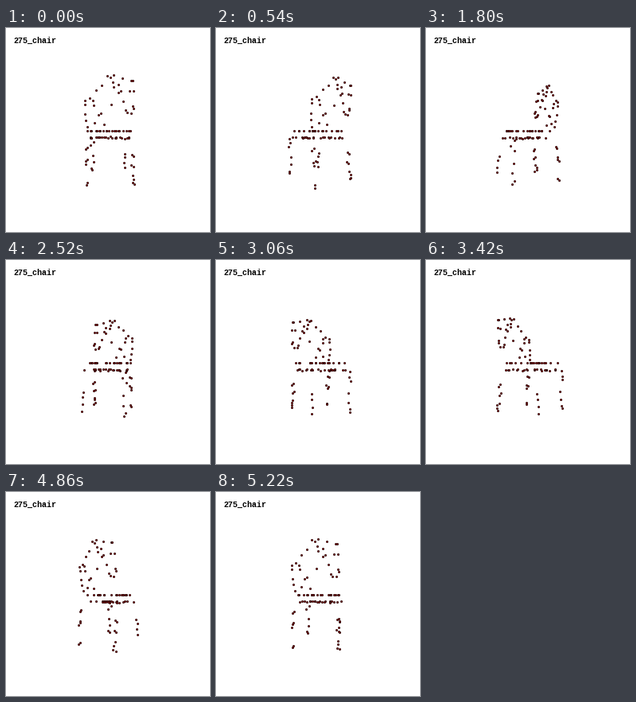
Write a matplotlib script that moves like this. It is 256 px wide and 256 px high and loops after 5400 ms.

```python
import numpy as np
import matplotlib.pyplot as plt
from matplotlib.animation import FuncAnimation

SIZE, DPI = 256, 100
FRAMES, STEP_MS = 30, 180
CENTER, CAMERA = 128, 230
rng = np.random.default_rng(7)

# Backrest: x (right) and y (up); depth follows from the lean of the back.
BACK = np.array([
    (-1.7, 60), (1.7, 58), (5.2, 60.5), (14.8, 57.2), (24.3, 54.8), (26, 54.6),
    (-7.8, 50.4), (-14, 45), (4.4, 53), (5.2, 48), (10.4, 50.4), (10.5, 42),
    (13, 43.7), (23, 43.7), (27.2, 43.5), (-27, 34), (-21.5, 36.7), (-18, 34),
    (-17, 28.7), (-27, 29.6), (2.7, 29.5), (16, 33), (27, 27.6), (27.6, 25),
    (18.7, 23), (20.5, 20.5), (25, 19.6), (-11.6, 18), (-9, 19.7), (-27, 18.9),
    (-26, 11.7), (-24.5, 4.5), (-16.3, 9), (-5.4, 7.2),
])

# Legs: foot position (x, z), splay per unit of drop, and drops below the seat.
LEGS = [
    (-23.5, -33, 0, [10, 16, 21, 35, 45, 53, 56]),
    (23.5, -33, 0, [33, 38, 46, 53]),
    (-26, 22, 0.1, [19, 21, 32, 34, 37, 58, 60]),
    (26, 22, 0.1, [27, 29, 38, 40, 50, 53, 57, 59]),
]


def backrest():
    x, y = BACK.T
    z = 22.5 + 0.13 * y + 0.09 * np.minimum(x, 0)
    return np.column_stack([x, y, z])


def seat(n, y):
    x = rng.permutation(np.linspace(-26, 26, n)) + rng.uniform(-1.5, 1.5, n)
    z = np.linspace(-32, 22, n) + rng.uniform(-2, 2, n)
    return np.column_stack([x, np.full(n, y), z])


def leg(x, z, splay, drops):
    drops = np.array(drops)
    jx, jz = rng.uniform(-2.2, 2.2, (2, len(drops)))
    return np.column_stack([x + jx, -drops, z + splay * drops + jz])


def project(points, angle):
    x, y, z = points.T
    c, s = np.cos(angle), np.sin(angle)
    scale = CAMERA / (CAMERA - (z * c - x * s))
    return np.column_stack([CENTER + (x * c + z * s) * scale, CENTER - y * scale])


chair = np.vstack([backrest(), seat(20, -0.3), seat(22, -8.6)] + [leg(*l) for l in LEGS])

fig = plt.figure(figsize=(SIZE / DPI, SIZE / DPI), dpi=DPI, facecolor="white")
ax = fig.add_axes([0, 0, 1, 1])
ax.set(xlim=(0, SIZE), ylim=(SIZE, 0))
ax.axis("off")

px = 72 / DPI
ax.text(9.2, 19, "275_chair", family="Liberation Mono", weight="bold",
        size=10 * px, color="black", va="baseline")
dots, = ax.plot([], [], "o", ms=2.1 * px, mfc="#a00000", mec="#200000", mew=0.8 * px)


def update(i):
    xy = project(chair, 2 * np.pi * i / FRAMES)
    dots.set_data(np.round(xy).T + 0.5)
    return dots,


anim = FuncAnimation(fig, update, frames=FRAMES, interval=STEP_MS,
                     repeat=True, repeat_delay=0)
plt.show()
```
